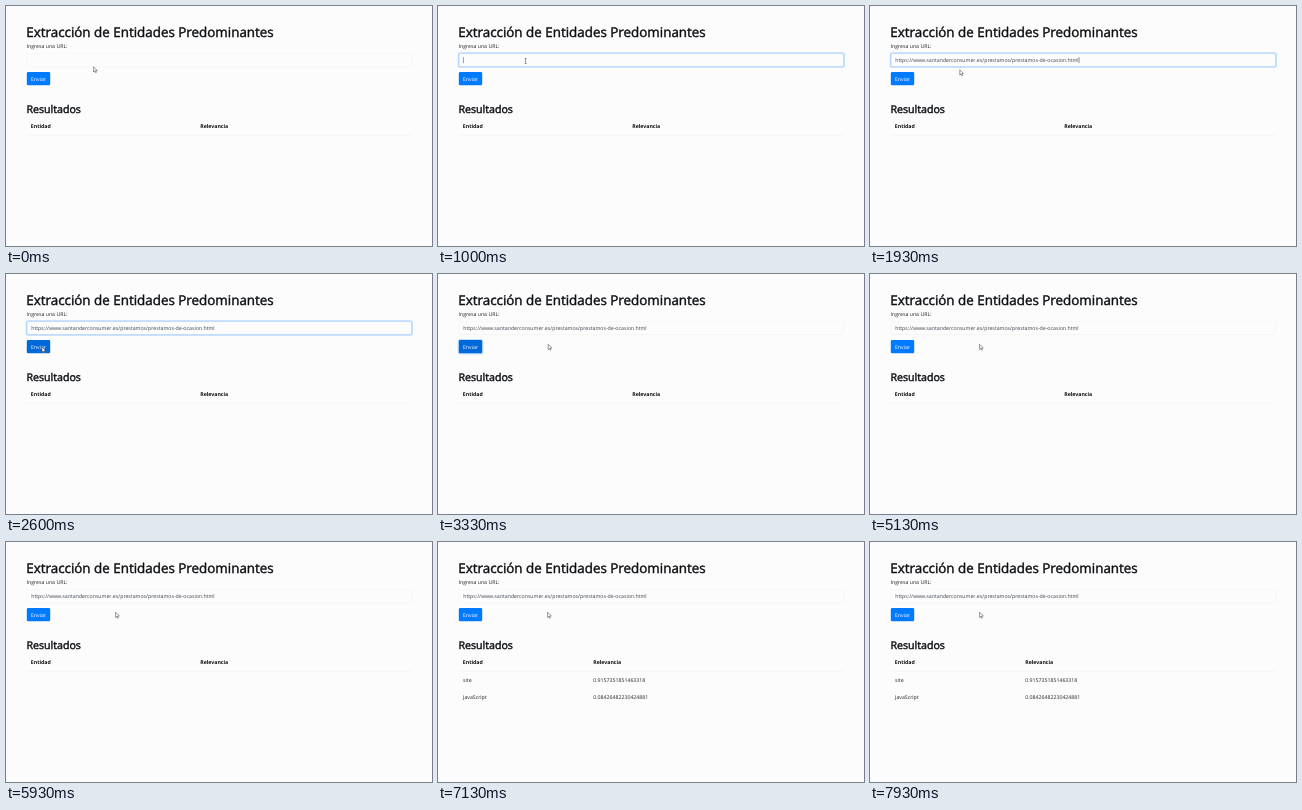
Recreate the animation shown at these times as an HTML page. Size 426 by 240 pixels, loop 8000 ms.

```html
<!DOCTYPE html>
<html lang="es">
<head>
<meta charset="utf-8">
<title>Extracción de Entidades</title>
<style>
  html, body { margin: 0; width: 100%; height: 100%; overflow: hidden; background: #fcfcfd; }
  svg { display: block; width: 100%; height: 100%; }
  text { font: 5.22px "Open Sans", "Noto Sans", sans-serif; fill: #212529; text-rendering: geometricPrecision; }
  .title { fill: #0c0f12; stroke: #0c0f12; stroke-width: .42; }
  .h1 { font-size: 13.4px; }
  .h2 { font-size: 10.65px; }
  .th { font-weight: 700; fill: #0c0f12; }
  .url { fill: #3c434a; }
  .label { fill: #fff; text-anchor: middle; }
  .glow { fill: none; stroke: #007bff; stroke-opacity: .25; stroke-width: 1.1; }
  .line { stroke: #f3f3f2; stroke-width: .7; }
</style>
</head>
<body>
<svg viewBox="0 0 426 240">
  <text class="title h1" x="20.3" y="30.9">Extracción de Entidades Predominantes</text>
  <text x="20.5" y="42.3">Ingresa una URL:</text>

  <rect id="inputGlow" class="glow" x="20.3" y="46.7" width="386" height="14.6" rx="2"/>
  <rect id="input" x="21" y="47.4" width="384.6" height="13.2" rx="1.4" fill="#fcfcfd" stroke-width=".5"/>
  <text id="url" class="url" x="25.2" y="56.1">https://www.santanderconsumer.es/prestamos/prestamos-de-ocasion.html</text>
  <path id="caret" stroke="#343a40" stroke-width=".5"/>

  <rect id="buttonGlow" class="glow" x="20.2" y="65.5" width="24.6" height="14.4" rx="2"/>
  <rect id="button" x="20.8" y="66" width="23.4" height="13.3" rx="1.4"/>
  <text class="label" x="32.5" y="74.5">Enviar</text>

  <text class="title h2" x="20.4" y="107">Resultados</text>
  <text class="th" x="24.8" y="122.4">Entidad</text>
  <text id="relevance" class="th" y="122.4">Relevancia</text>
  <path class="line" d="M21 129.2H405.6"/>
  <g id="rows">
    <text x="25" y="139.6">site</text>
    <text x="155.2" y="139.6">0.9157351851463318</text>
    <text x="25" y="156.6">JavaScript</text>
    <text x="155.2" y="156.6">0.08426482230424881</text>
  </g>

  <path id="arrow" d="M0 0V5.2L1.2 4.1L2 5.9L2.8 5.5L2 3.8H3.7Z" fill="#fff" stroke="#333" stroke-width=".5"/>
  <path id="beam" d="M-.9-2.5H.9M0-2.5V2.5M-.9 2.5H.9" fill="none" stroke="#333" stroke-width=".5"/>
</svg>
<script>
  const LOOP = 8000, FOCUS = 700, PASTE = 1300, CLICK = 2650, RELOAD = 3600, RESULTS = 6500;
  // Pointer stops: time, x, y
  const STOPS = [
    [0, 87.6, 60.8], [250, 87.6, 60.8], [550, 87.6, 55], [1450, 87.6, 55], [1800, 89.8, 63.8],
    [2100, 89.8, 63.8], [2550, 36, 73], [2750, 36, 73], [3150, 110.2, 70.3],
    [3600, 110.2, 70.3], [3800, 109.6, 70.3]
  ];
  const $ = id => document.getElementById(id);
  const show = (id, on) => $(id).setAttribute('visibility', on ? 'visible' : 'hidden');
  const ease = p => p * p * (3 - 2 * p);

  function pointerAt(t) {
    const i = STOPS.findIndex(stop => stop[0] > t);
    if (i < 0) return STOPS[STOPS.length - 1].slice(1);
    const [t0, x0, y0] = STOPS[i - 1], [t1, x1, y1] = STOPS[i];
    const p = ease((t - t0) / (t1 - t0));
    return [x0 + (x1 - x0) * p, y0 + (y1 - y0) * p];
  }

  function draw(t) {
    const focused = t >= FOCUS && t < CLICK;
    const pressed = t >= CLICK && t < RELOAD;
    const done = t >= RESULTS;
    const [x, y] = pointerAt(t);
    const overInput = y > 47 && y < 60.4;
    const overButton = x > 21 && x < 44 && y > 66 && y < 79;

    show('inputGlow', focused);
    $('input').setAttribute('stroke', focused ? '#80bdff' : '#f0f1f1');
    show('url', t >= PASTE);
    const caretX = t >= PASTE ? 25.2 + $('url').getComputedTextLength() + .4 : 25.4;
    $('caret').setAttribute('d', `M${caretX} 51.2V57.2`);
    show('caret', focused && (t - PASTE + LOOP) % 1060 < 640);

    show('buttonGlow', pressed);
    $('button').setAttribute('fill', pressed || overButton ? '#0069d9' : '#007bff');

    $('relevance').setAttribute('x', done ? 155.2 : 194.2);
    show('rows', done);

    show('arrow', !overInput);
    show('beam', overInput);
    for (const id of ['arrow', 'beam']) $(id).setAttribute('transform', `translate(${x} ${y})`);
  }

  const start = performance.now();
  function frame() {
    draw((performance.now() - start) % LOOP);
    requestAnimationFrame(frame);
  }
  frame();
</script>
</body>
</html>
```
